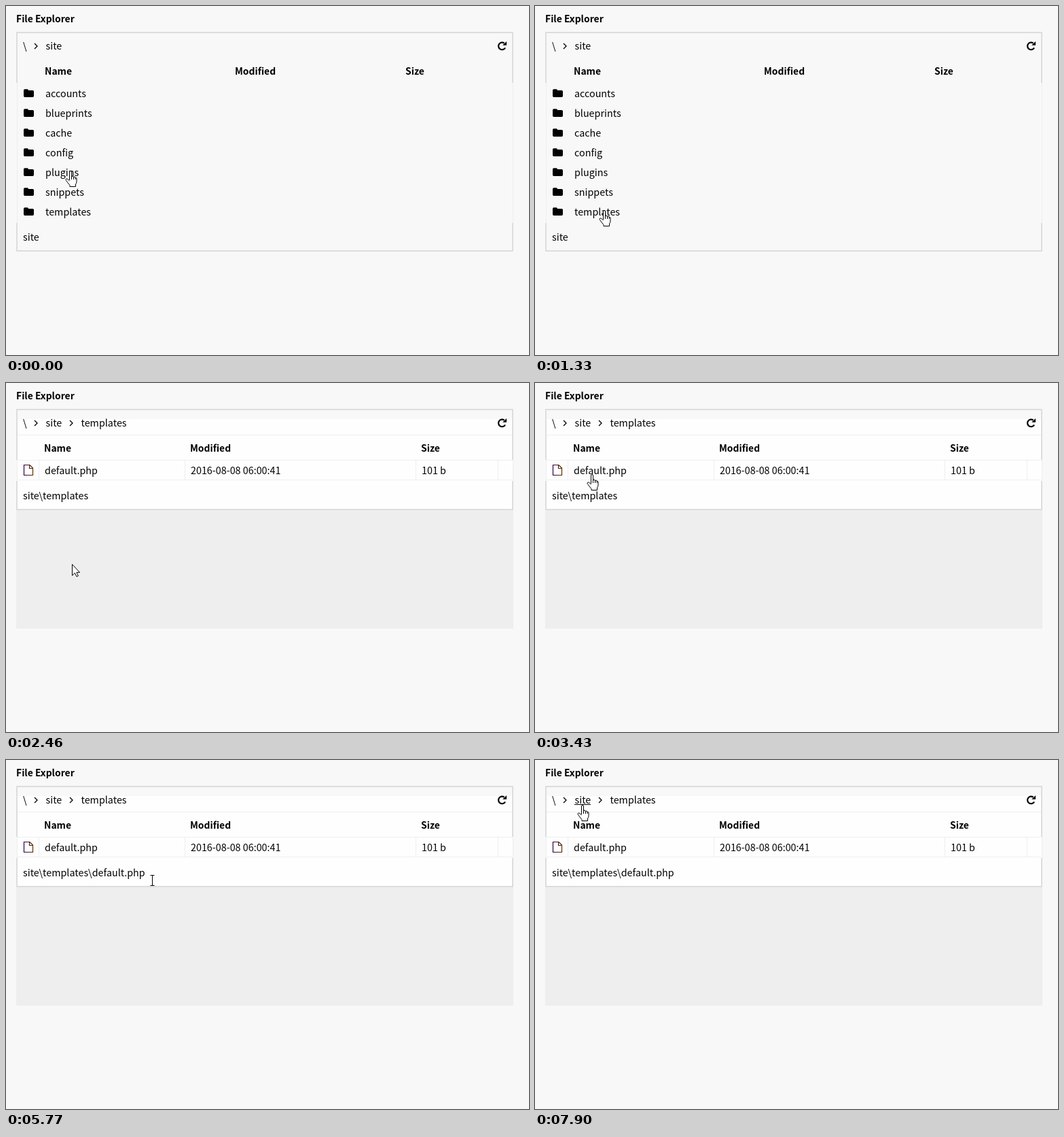
An HTML page that plays this animation: 770x513 px, repeating every 8 s.

```html
<!DOCTYPE html>
<html lang="en">
<head>
<meta charset="utf-8">
<title>File Explorer</title>
<style>
html, body { margin: 0; width: 100%; height: 100%; overflow: hidden; background: #f8f8f8; }
svg { display: block; width: 770px; height: 513px; }
text { font: 14.33px "Noto Sans CJK JP", "Noto Sans CJK SC", "Noto Sans CJK", "Open Sans", sans-serif; }
.bold { font-weight: 600; font-size: 13.9px; }
.chevron { fill: none; stroke: #000; stroke-width: 1.3; }
.rule { fill: none; stroke: #eee; }
</style>
</head>
<body>
<svg viewBox="0 0 770 513">
  <defs>
    <linearGradient id="ink">
      <stop offset="0" stop-color="#30004a"/>
      <stop offset="1" stop-color="#5a3000"/>
    </linearGradient>
    <path id="folder" d="M26 124Q26 122.3 27.7 122.3H31.5Q33 122.3 33 124H39.3Q41 124 41 125.7V132.3Q41 134 39.3 134H27.7Q26 134 26 132.3Z"/>
    <path id="angle" class="chevron" d="M42 55L46 59 42 63"/>
  </defs>
  <g id="rootView"></g>
  <g id="templatesView"></g>
  <g id="chrome">
    <use href="#angle"/>
    <path d="M735 61.5A5.3 5.3 0 1 1 733.6 54.7" fill="none" stroke="#000" stroke-width="2.2"/>
    <path d="M737 52V57.8H731.2Z"/>
  </g>
  <path id="underline" d="M58 65.5H82" stroke="#000"/>
  <g id="cursor" stroke="#000" fill="#fff">
    <g id="hand">
      <path d="M-.5 14V2Q-.5 .5 1 .5T2.5 2V9Q2.7 7.8 4 8T5.5 10Q5.7 8.8 7 9T8.2 11Q8.4 10 9.4 10.4T10 12V16Q10 18.5 8.5 20V23.5H0V21.5Q-3 18 -5.5 14.5Q-6.5 13 -5.5 12.2T-3 12.6L-.5 15"/>
      <path d="M2.5 9V13M5.5 10V13M8.2 11V13" fill="none"/>
    </g>
    <path id="arrow" d="M.5 .5V17L4.4 13.3 7 18.6 9.4 17.5 6.9 12.4H11.5Z"/>
    <path id="beam" d="M-2.5 -7.5H3.5M.5 -7.5V7.5M-2.5 7.5H3.5" fill="none"/>
  </g>
</svg>
<script>
const LOOP = 8000, OPEN_FOLDER = 1600, SELECT_FILE = 3960, STEP = 140, ROW = 29;
const el = id => document.getElementById(id);
const show = (id, on) => el(id).style.display = on ? "" : "none";
const label = (x, y, text, cls = "") => `<text x="${x}" y="${y}" class="${cls}">${text}</text>`;
const headings = (...xs) =>
  ["Name", "Modified", "Size"].map((name, i) => label(xs[i], 101, name, "bold")).join("");

// Panel border: two pixels thick, one lighter pixel beside the table rows.
const frame = (bottom, tableEnd) => `
  <path d="M16 113V39H746V113M16 ${tableEnd}V${bottom - 1}H746V${tableEnd}" fill="none" stroke="#ddd" stroke-width="2"/>
  <path class="rule" d="M16.5 113V${tableEnd}M746.5 113V${tableEnd}"/>`;

const folders = ["accounts", "blueprints", "cache", "config", "plugins", "snippets", "templates"];
el("rootView").innerHTML = frame(361, 319) + headings(57, 337, 588) +
  folders.map((name, i) =>
    `<use href="#folder" y="${i * ROW}"/>` + label(58, 134 + i * ROW, name)).join("") +
  label(25, 345, "site");

el("templatesView").innerHTML = `
  <path d="M15 187H747V361H15Z" fill="#eee"/>
  <path d="M16 53H746V186H16Z" fill="#fefefe"/>` + frame(187, 144) + `
  <path class="rule" d="M17 76.5H745M17 113.5H745M17 142.5H745M48.5 113V143M263.5 113V143M603.5 113V143M724.5 113V143"/>
  <path d="M26.5 120.5H35L39.5 125V135.5H26.5ZM34.5 120.5V125.5H39.5" fill="none" stroke="url(#ink)" stroke-width="1.2"/>
  <use href="#angle" x="52"/>` + headings(56, 271, 611) +
  label(110.5, 64, "templates") + label(57, 134, "default.php") +
  label(272, 134, "2016-08-08 06:00:41") + label(612, 134, "101 b") +
  `<text id="path" x="25" y="171"></text>`;

el("chrome").insertAdjacentHTML("beforeend",
  label(15, 24, "File Explorer", "bold") + label(25, 64, "\\") + label(58.5, 64, "site"));

// Each move eases from the last position to the next, bowed sideways by bend.
const home = [94, 242];
const moves = [
  { start: 780, end: 1330, to: [101, 300] },
  { start: 2190, end: 3160, to: [82, 140] },
  { start: 3280, end: 3430, to: [83, 134] },
  { start: 4640, end: 5610, to: [217, 177], bend: [-30, 25] },
  { start: 5770, end: 6770, to: [179, 172], bend: [-60, -16] },
  { start: 6890, end: 7900, to: [69, 66], bend: [40, -20] }
];
const inOut = p => p < .5 ? 4 * p ** 3 : 1 - 4 * (1 - p) ** 3;

// The pointer advances in discrete steps, the first one at the start of the move.
function progress(t, { start, end }) {
  const gaps = Math.round((end - start) / STEP);
  const taken = Math.floor((t - start) / (end - start) * gaps + 1.06);
  return inOut(Math.min(1, taken / (gaps + 1)));
}

function pointerAt(t) {
  let position = home;
  for (const move of moves) {
    if (t < move.start) break;
    const p = progress(t, move), bend = move.bend || [0, 0];
    position = position.map((from, axis) =>
      from + (move.to[axis] - from) * p + bend[axis] * Math.sin(Math.PI * p));
  }
  return position.map(Math.round);
}

function pointerKind(x, y, inTemplates, onSite) {
  if (!inTemplates || onSite) return "hand";
  if (y > 120 && y < 140 && x > 56 && x < 135) return "hand";
  return y > 156 && y < 187 ? "beam" : "arrow";
}

function draw(now) {
  const t = now % LOOP;
  const inTemplates = t >= OPEN_FOLDER;
  const [x, y] = pointerAt(t);
  const onSite = inTemplates && y > 50 && y < 72 && x > 57 && x < 83;
  const kind = pointerKind(x, y, inTemplates, onSite);
  show("rootView", !inTemplates);
  show("templatesView", inTemplates);
  show("underline", onSite);
  el("path").textContent = "site\\templates" + (t >= SELECT_FILE ? "\\default.php" : "");
  for (const id of ["hand", "arrow", "beam"]) show(id, id === kind);
  el("cursor").setAttribute("transform", `translate(${x} ${y})`);
}

const began = performance.now();
function tick() {
  draw(performance.now() - began);
  requestAnimationFrame(tick);
}
tick();
</script>
</body>
</html>
```
